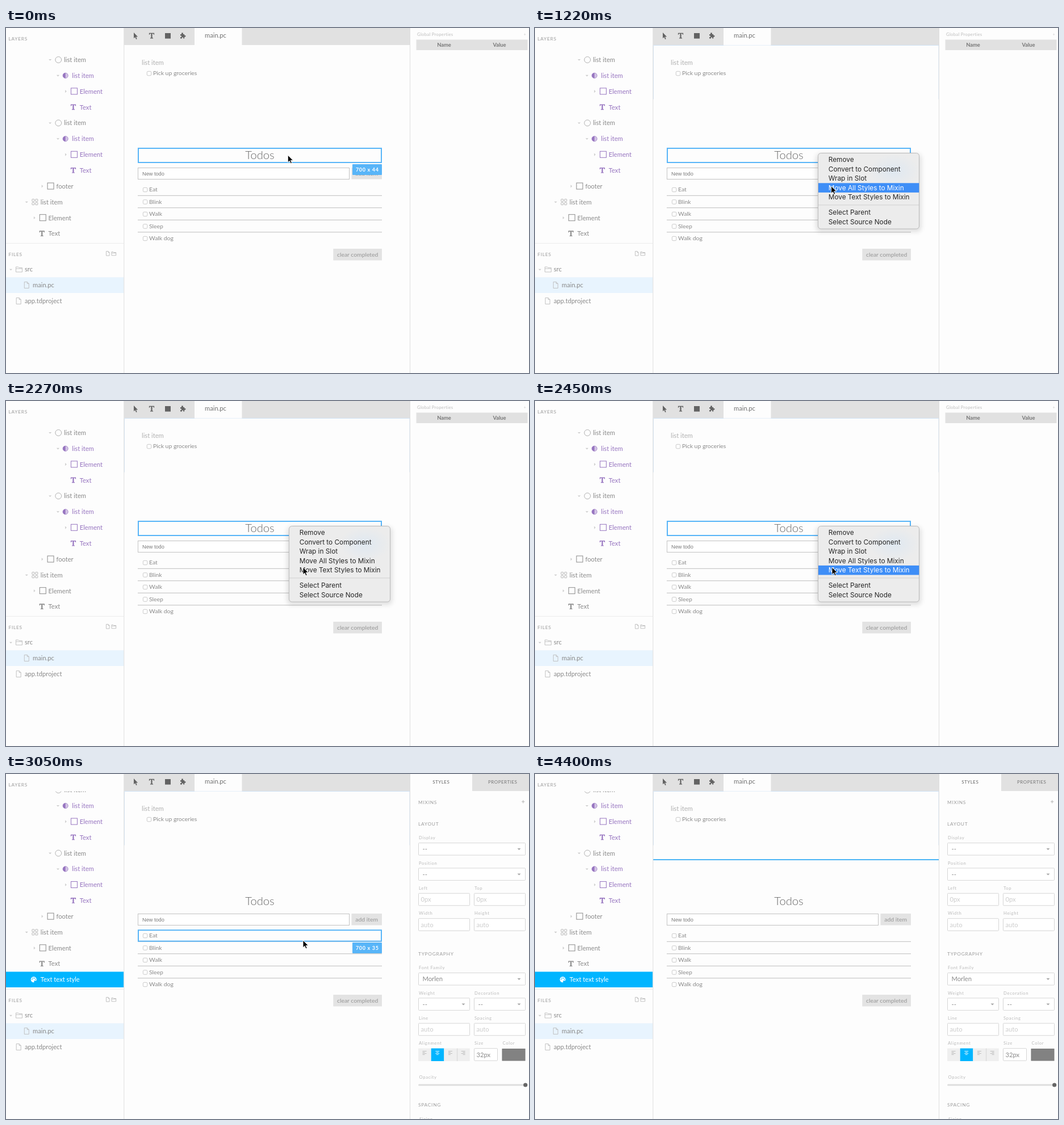
An HTML page that plays this animation: 921x608 px, repeating every 4880 ms.

```html
<!DOCTYPE html>
<html lang="en">
<head>
<meta charset="utf-8">
<title>Todo editor</title>
<style>
  html, body { margin: 0; width: 100%; height: 100%; overflow: hidden; background: #fdfdfd; }
  svg { display: block; width: 921px; height: 608px; font-family: Lato, "Open Sans", sans-serif; }
  .ui { font-size: 11.2px; }
  .doc { font-size: 10.4px; }
  .title { font-size: 20.2px; font-weight: 300; }
  .head { font-size: 8.3px; letter-spacing: .75px; }
  .tab { font-size: 8px; letter-spacing: .5px; }
  .label { font-size: 7.7px; letter-spacing: .65px; }
  .panel { font-size: 7.7px; letter-spacing: .3px; }
  .tag { font-size: 9px; font-weight: 700; letter-spacing: .7px; }
  .th { font-size: 9.4px; font-weight: 700; }
  .field { font: 9.2px "Liberation Sans", Arial, sans-serif; }
  .menu { font: 11.8px Inter, Roboto, sans-serif; }
  .mid { text-anchor: middle; }
</style>
</head>
<body>
<svg id="stage" viewBox="0 0 921 608" xmlns="http://www.w3.org/2000/svg"></svg>
<script>
const LOOP = 4880;
const PURPLE = '#9775c0', GREY = '#8a8a8a', HEAD = '#9c9c9c', PALE = '#bababa';
const BLUE = '#58b5f8', ACTIVE = '#00b5ff';

const text = (x, y, str, cls, fill = GREY) => `<text x="${x}" y="${y}" class="${cls}" fill="${fill}">${str}</text>`;
const rect = (x, y, w, h, fill, more = '') => `<rect x="${x}" y="${y}" width="${w}" height="${h}" fill="${fill}" ${more}/>`;
const box = (x, y, w, h, stroke, width = 1, fill = 'none', r = 0) =>
  rect(x, y, w, h, fill, `stroke="${stroke}" stroke-width="${width}" rx="${r}"`);
const path = (d, fill, stroke = 'none', width = 1) => `<path d="${d}" fill="${fill}" stroke="${stroke}" stroke-width="${width}"/>`;
const group = (id, body) => `<g id="${id}">${body}</g>`;
const caretDown = (x, y, fill = '#cdcdcd', s = 2.6) => path(`M${x - s} ${y - s / 2}h${2 * s}l${-s} ${s}z`, fill);
const caretRight = (x, y) => path(`M${x - 1.2} ${y - 2.6}v5.2l2.8-2.6z`, '#d0d0d0');
const letterT = (x, y, c) => path(`M${x - 4.6} ${y - 4.7}h9.2v3h-1l-.7-1.7h-1.8v7l1.5.5v.8h-5.2v-.8l1.5-.5v-7h-1.8l-.7 1.7h-1z`, c);

const icons = {
  circle: (x, y) => `<circle cx="${x + .4}" cy="${y}" r="5.4" fill="none" stroke="#b0b0b0"/>`,
  half: (x, y, c) => `<circle cx="${x - 1}" cy="${y}" r="4.6" fill="#d3c4e5" stroke="${c}" stroke-width=".7"/>` +
    path(`M${x - 1} ${y - 4.6}a4.6 4.6 0 0 0 0 9.2z`, c),
  square: (x, y, c) => box(x - 5, y - 5.8, 11, 11, c),
  text: (x, y, c) => letterT(x - 1, y - .3, c),
  grid: (x, y) => [0, 1, 2, 3].map(i => box(x - 4.6 + i % 2 * 6, y - 5 + (i >> 1) * 6, 4, 4, '#b0b0b0', .9, 'none', .5)).join(''),
  palette: (x, y) => `<circle cx="${x - 1.7}" cy="${y}" r="5" fill="#fff"/>` +
    [[-4.5, -.5], [-3, -2.7], [-.3, -2.7], [1.3, -.5]].map(([a, b]) =>
      `<circle cx="${x + a}" cy="${y + b}" r=".9" fill="${ACTIVE}"/>`).join('') +
    path(`M${x - 1} ${y + 2}h5v3.5h-5z`, ACTIVE)
};

// depth, icon, label, colour, caret (v = open, > = closed)
const layers = [
  [3, 'circle', 'list item', GREY, 'v'], [4, 'half', 'list item', PURPLE, 'v'],
  [5, 'square', 'Element', PURPLE, '>'], [5, 'text', 'Text', PURPLE],
  [3, 'circle', 'list item', GREY, 'v'], [4, 'half', 'list item', PURPLE, 'v'],
  [5, 'square', 'Element', PURPLE, '>'], [5, 'text', 'Text', PURPLE],
  [2, 'square', 'footer', GREY, '>'], [0, 'grid', 'list item', GREY, 'v'],
  [1, 'square', 'Element', GREY, '>'], [1, 'text', 'Text', GREY],
  [0, 'palette', 'Text text style', '#fff']
];

function layerRow([depth, icon, label, color, caret], i) {
  const x = 50.5 + depth * 13.8, y = 56 + i * 27.85;
  return (icon === 'palette' ? rect(0, y - 13.9, 207.5, 27.8, ACTIVE) : '') +
    (caret === 'v' ? caretDown(x - 14.2, y + .3) : caret ? caretRight(x - 14.2, y) : '') +
    icons[icon](x, y, color) + text(x + 10.3, y + 4, label, 'ui', color);
}

const fileIcon = (x, y, s = 1) =>
  path(`M${x} ${y}h${5 * s}l${3 * s} ${3 * s}v${8 * s}h${-8 * s}zM${x + 5 * s} ${y}v${3 * s}h${3 * s}`, 'none', '#bdbdbd', .9);
const folderIcon = (x, y, s = 1) =>
  path(`M${x} ${y}h${4 * s}l${1.5 * s} ${1.6 * s}h${5.5 * s}v${7.4 * s}h${-11 * s}zM${x} ${y + 3 * s}h${11 * s}`, 'none', '#bdbdbd', .9);

function sidebar() {
  return text(4.5, 22, 'LAYERS', 'head', HEAD) +
    `<clipPath id="treeClip"><rect y="30.5" width="207.5" height="345.5"/></clipPath>
     <g clip-path="url(#treeClip)">${group('tree', layers.map(layerRow).join(''))}</g>` +
    rect(0, 379, 207.5, 1, '#ececec') + text(4.5, 401.8, 'FILES', 'head', HEAD) +
    fileIcon(176.5, 393.5, .7) + folderIcon(186, 394.5, .7) +
    caretDown(8.5, 426) + folderIcon(17.5, 421) + text(33, 429.4, 'src', 'ui') +
    rect(0, 439.3, 207.5, 27.7, '#e8f4fe') + fileIcon(32.3, 447.5) + text(47, 457.2, 'main.pc', 'ui') +
    fileIcon(18.2, 475.5) + text(33, 485, 'app.tdproject', 'ui');
}

function toolbar() {
  const c = '#636363';
  return rect(208, 0, 503.5, 30, '#e1e1e1') + rect(332, 0, 83.5, 30.5, '#fdfdfd') +
    path('M225 8v10.2l2.4-2.2 1.7 3.9 1.6-.7-1.7-3.8h3.2z', c) + letterT(256.5, 13.5, c) +
    rect(280, 9, 10, 9.6, c) +
    path('M307 11h2.3c-.8-1.2-.3-2.8 1.2-2.8s2 1.6 1.2 2.8h2.5v2.2c1-.7 2.3-.2 2.3 1.1s-1.3 1.8-2.3 1.1v3h-2.2c.6-1.1.2-2.2-.9-2.2s-1.6 1.1-1 2.2H307v-2.7c1.2.6 2.1 0 2.1-1s-.9-1.5-2.1-.9z', c) +
    text(369, 17.3, 'main.pc', 'ui mid', '#747474');
}

const checkbox = (x, y) => box(x, y, 7.4, 7.4, '#c4c4c4', .9, '#fff', 1.8);
const selection = (y, h) => box(233, y, 428, h, BLUE, 2);
const sizeTag = (y, label) => rect(610, y, 52, 19, BLUE, 'rx="1"') + text(636.3, y + 12.9, label, 'tag mid', '#fff');

function documentView() {
  const items = ['Eat', 'Blink', 'Walk', 'Sleep', 'Walk dog'];
  return text(239, 64.5, 'list item', 'ui', '#b0b0b0') + checkbox(248.3, 76.4) +
    text(259, 83.3, 'Pick up groceries', 'doc') + text(447, 231.3, 'Todos', 'title mid', '#686868') +
    box(232.5, 246.5, 372, 20, '#c2c2c2', 1, '#fff') + text(240, 260.4, 'New todo', 'field', '#787878') +
    rect(608.5, 246, 53.5, 20.5, '#e3e3e3') + text(635.2, 259.6, 'add item', 'doc mid', '#959595') +
    items.map((name, i) => {
      const y = 284.5 + i * 21.5;
      return checkbox(241.4, y - 3.2) + text(252, y + 3.6, name, 'doc') +
        (i < 4 ? rect(232, y + 10.3, 430, 1, '#bdbdbd') : '');
    }).join('') +
    rect(576.3, 389, 85.7, 20.5, '#e3e3e3') + text(619.2, 402.9, 'clear completed', 'doc mid', '#959595');
}

const menuItems = ['Remove', 'Convert to Component', 'Wrap in Slot', 'Move All Styles to Mixin',
  'Move Text Styles to Mixin', 'Select Parent', 'Select Source Node'];
const menuY = i => 231.8 + i * 16.6 + (i > 4 ? 10.2 : 0);

function contextMenu() {
  return `<defs>
      <filter id="soft" x="-20%" y="-20%" width="140%" height="140%"><feGaussianBlur stdDeviation="4"/></filter>
      <radialGradient id="tint"><stop stop-color="#dfe8f1"/><stop offset="1" stop-color="#dfe8f1" stop-opacity="0"/></radialGradient>
    </defs>` +
    rect(495, 222, 185, 137, '#000', 'rx="7" opacity=".12" filter="url(#soft)"') +
    box(498.5, 220.5, 178, 133.5, '#b9b9b9', 1, '#ececec', 5) +
    '<ellipse cx="632" cy="252" rx="44" ry="30" fill="url(#tint)"/>' +
    rect(499, 311.3, 177, 1.2, '#d6d6d6') + rect(499, 0, 177.3, 16.6, '#3e8ef7', 'id="highlight"') +
    menuItems.map((item, i) => text(516.8, menuY(i) + 4.2, item, 'menu', '#262626')).join('');
}

function globalPanel() {
  return text(724, 14.2, 'Global Properties', 'panel', '#bcbcbc') +
    text(914, 13.5, '+', 'label mid', '#d2d2d2') + rect(722.5, 20.5, 196, 18.5, '#e1e1e1') +
    text(771.5, 33.3, 'Name', 'th mid', '#777') + text(869, 33.3, 'Value', 'th mid', '#777');
}

function stylePanel() {
  const left = 726.5, right = 824.5, half = 90, full = 188;
  const label = (x, y, str) => text(x + .5, y + 2.6, str, 'label', PALE);
  const field = (x, y, w, value, fill, arrow) => box(x, y, w, 21.5, '#d6d6d6', 1, '#fff', 1) +
    text(x + (arrow ? 7 : 4), y + 14.8, value, 'ui', fill) + (arrow ? caretDown(x + w - 11, y + 11, '#a5a5a5', 3) : '');
  const head = (y, str) => text(726, y + 3, str, 'head', HEAD);
  const input = (x, y, w, name, value, fill = '#cdcdcd') => label(x, y, name) + field(x, y + 8.9, w, value, fill);
  const select = (x, y, w, name, value = '--') => label(x, y, name) + field(x, y + 8.9, w, value, GREY, true);
  const align = [0, 1, 2, 3].map(i => {
    const x = 726 + i * 22.7, on = i === 1;
    const lines = [7, 4, 7, 4].map((w, k) =>
      rect(x + 7.5 + [0, (7 - w) / 2, 0, 7 - w][i], 488 + k * 2, w, .8, on ? '#fff' : '#b2b2b2')).join('');
    return rect(x, 483.5, 22.7, 22.5, on ? ACTIVE : '#efefef') + (i === 3 ? rect(x, 483.5, 1, 22.5, '#d5d5d5') : '') + lines;
  }).join('');
  return rect(821, 0, 100, 30, '#e1e1e1') + text(766.2, 17.3, 'STYLES', 'tab mid', '#666') +
    text(874.7, 17.3, 'PROPERTIES', 'tab mid', '#747474') +
    head(49.5, 'MIXINS') + path('M908 48.8h5.4M910.7 46.1v5.4', 'none', '#b5b5b5') +
    head(88, 'LAYOUT') + select(left, 112.6, full, 'Display') + select(left, 157, full, 'Position') +
    input(left, 201.4, half, 'Left', '0px') + input(right, 201.4, half, 'Top', '0px') +
    input(left, 245.8, half, 'Width', 'auto') + input(right, 245.8, half, 'Height', 'auto') +
    head(317, 'TYPOGRAPHY') + select(left, 341.6, full, 'Font Family', 'Morlen') +
    select(left, 386, half, 'Weight') + select(right, 386, half, 'Decoration') +
    input(left, 430.4, half, 'Line', 'auto') + input(right, 430.4, half, 'Spacing', 'auto') +
    label(left, 474.8, 'Alignment') + align + input(right, 474.8, 41, 'Size', '32px', GREY) +
    label(874, 474.8, 'Color') + box(874, 484.5, 40, 20.5, '#777', 1, '#828282') +
    label(727, 534, 'Opacity') + rect(726, 546.5, 189, 3, '#dedede', 'rx="1.5"') +
    '<circle cx="914.7" cy="548" r="3.6" fill="#666"/>' + head(582.5, 'SPACING') + label(727.5, 608, 'Sizing');
}

document.getElementById('stage').innerHTML =
  rect(0, 0, 921, 608, '#fdfdfd') + sidebar() + documentView() +
  group('frameEdge', path('M208.5 125.5V30.5H711V125.5', 'none', '#d0e2f5')) +
  group('titleSelection', selection(212, 25) + sizeTag(240, '700 x 44')) +
  group('itemSelection', selection(275.2, 19.4) + sizeTag(297, '700 x 35')) +
  group('pageSelection', rect(208, 150, 503.5, 2, '#4db5f5')) +
  toolbar() + rect(207.3, 0, 1, 608, '#dfdfdf') + rect(711, 0, 1, 608, '#dfdfdf') +
  group('globals', globalPanel()) + group('styles', stylePanel()) + group('menu', contextMenu()) +
  group('cursor', path('M0 0v13l3-2.8 2 4.6 2.2-1-2-4.5h4.1z', '#000', '#fff', .9));

const part = Object.fromEntries([...document.querySelectorAll('g[id], #highlight')].map(el => [el.id, el]));
const labels = [...document.querySelectorAll('text.menu')];
const show = (el, on) => el.setAttribute('visibility', on ? 'visible' : 'hidden');

// time, cursor x, cursor y, menu opacity, highlighted item
const steps = [
  [0, 496.3, 224, 0, -1], [660, 496.3, 224, 1, -1],
  [980, 501, 234, 1, 0], [1100, 514, 261, 1, 2], [1220, 521.6, 278.5, 1, 3],
  [1340, 523, 290.5, 1, 4], [1460, 523, 293, 1, 4],
  [2270, 523, 293, 1, -1], [2360, 523, 293, 1, 4], [2460, 523, 293, .65, 4],
  [2560, 523, 293, .25, 4], [2660, 523, 293, 0, -1],
  [4010, 586, 361.5, 0, -1], [4190, 706, 478, 0, -1], [4295, 864, 596, 0, -1], [4400, 930, 640, 0, -1]
];

function render(t) {
  const [, x, y, opacity, active] = steps.findLast(step => step[0] <= t);
  const extracted = t >= 3050, onPage = t >= 4190;
  part.cursor.setAttribute('transform', `translate(${x} ${y})`);
  part.menu.setAttribute('opacity', opacity);
  show(part.highlight, active >= 0);
  part.highlight.setAttribute('y', menuY(Math.max(active, 0)) - 8.3);
  labels.forEach((el, i) => el.setAttribute('fill', i === active ? '#fff' : '#262626'));
  part.tree.setAttribute('transform', `translate(0 ${extracted ? -27.85 : 0})`);
  show(part.frameEdge, t >= 660);
  show(part.titleSelection, !extracted);
  show(part.itemSelection, extracted && !onPage);
  show(part.pageSelection, onPage);
  show(part.globals, !extracted);
  show(part.styles, extracted);
}

const start = performance.now();
function tick() {
  render((performance.now() - start) % LOOP);
  requestAnimationFrame(tick);
}
tick();
</script>
</body>
</html>
```
